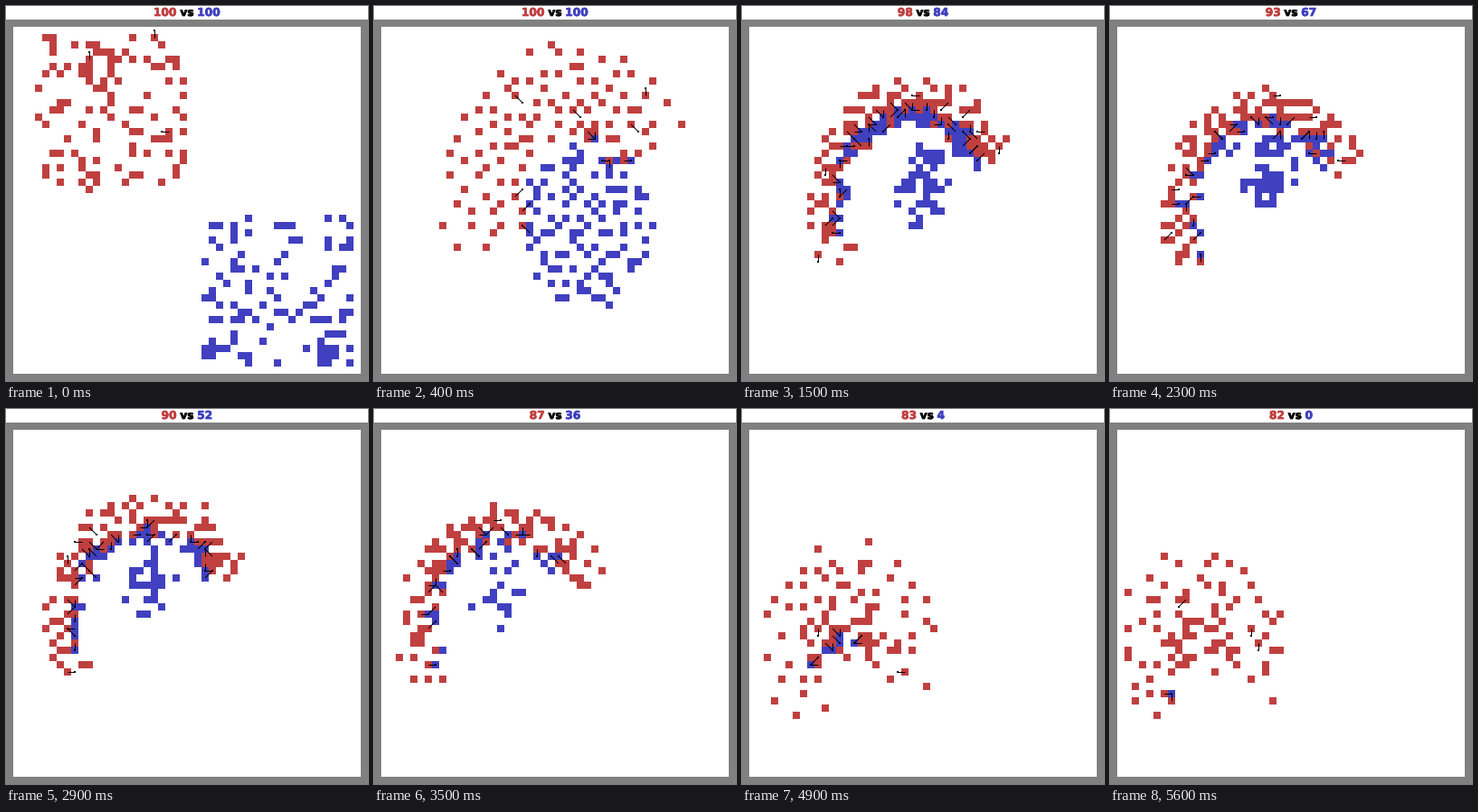
A matplotlib script that plays this animation: 400x415 px, repeating every 5.7 s.

```python
import numpy as np
import matplotlib.pyplot as plt
from matplotlib.animation import FuncAnimation
from matplotlib.collections import LineCollection, PolyCollection
from matplotlib.patches import Rectangle
from matplotlib.patheffects import withStroke

W, H, CELL, SIZE, N = 400, 415, 8, 48, 100
FRAMES, STEP, CLASH = 57, 100, 4
COLORS = {"red": "#c04040", "blue": "#4040c0"}
TIMES = [0, 4, 15, 23, 35, 49, 56]
COUNTS = {
    "red": [100, 100, 98, 93, 87, 83, 82],
    "blue": [100, 100, 84, 67, 36, 4, 0],
}

rng = np.random.default_rng(12)
GOLDEN = (5 ** 0.5 - 1) / 2
IDX = np.arange(N)
U = (IDX + 0.5) / N                       # place along the battle line
V = 2 * (IDX * GOLDEN % 1) - 1            # place across it
TURN = 2 * np.pi * GOLDEN * IDX           # sunflower layout of the core
DISC = np.c_[np.cos(TURN), np.sin(TURN)] * np.sqrt(U)[:, None]
PHASE = {team: rng.uniform(0, 2 * np.pi, (N, 2)) for team in COLORS}
RANK = {team: rng.permutation(N) for team in COLORS}
FRONT = rng.random((N, 1)) < 0.55         # blue fighters who meet the line


def ease(t, a, b):
    x = np.clip((t - a) / (b - a), 0, 1)
    return x * x * (3 - 2 * x)


def arc(t, side, closing):
    """Points on the drifting battle arc, moved off it by side."""
    angle = np.radians(215 + 35 * closing - (190 + 95 * closing) * U ** 0.85)
    r = 100 - 45 * closing + side
    s = t - CLASH
    return np.c_[215 - 2.2 * s + r * np.cos(angle),
                 205 + 1.15 * s - 1.15 * r * np.sin(angle)]


def formation(team, t):
    closing = ease(t, 35, 49)
    gather = ease(t, CLASH, 15)
    width = 45 - 27 * gather + 25 * closing
    if team == "red":
        p = arc(t, width * V, closing)
    else:
        last = 1 - ease(t, 42, 56)
        center = [235 - 3.06 * (t - CLASH), 190 + 0.128 * (t - 24) ** 2]
        core = center + DISC * [70, 92] * (1 - 0.55 * gather) * last
        line = arc(t, 8 * V - width, closing)
        p = core + (line - core) * FRONT * gather * last
    p = p + 5 * np.sin(0.4 * t + PHASE[team])
    return (p - [8, 23]) / CELL - 0.5


def lattice(p):
    """Order points column by column, top to bottom."""
    cols = np.argsort(p[:, 0]).reshape(10, 10)
    return np.concatenate([c[np.argsort(p[c, 1])] for c in cols])


def camp(team, x, y, cols, rows):
    """Random start cells, matched to the first formation."""
    k = rng.choice(cols * rows, N, replace=False)
    cells = np.c_[x + k % cols, y + k // cols].astype(float)
    start = np.empty((N, 2))
    start[lattice(formation(team, CLASH))] = cells[lattice(cells)]
    return start


CAMPS = {"blue": camp("blue", 26, 26, 21, 21),
         "red": camp("red", 3, 1, 21, 22)}
SPAN = range(-6, 7)
NEAR = sorted(((dx, dy) for dx in SPAN for dy in SPAN),
              key=lambda d: d[0] ** 2 + d[1] ** 2)
AROUND = NEAR[1:9]


def count(team, t):
    return int(round(np.interp(t, TIMES, COUNTS[team])))


def place(t):
    """Cell -> team, every fighter on the nearest free cell."""
    board = {}
    f = min(t / CLASH, 1)
    for team, start in CAMPS.items():
        pos = start * (1 - f) + formation(team, max(t, CLASH)) * f
        pos = np.rint(pos).astype(int)
        # the fallen stay visible for one more step
        for x, y in pos[RANK[team] < count(team, t - 1)]:
            for dx, dy in NEAR:
                c = (int(x) + dx, int(y) + dy)
                if c not in board and 0 <= min(c) and max(c) < SIZE:
                    board[c] = team
                    break
    return board


def attacks(board, t):
    dice = np.random.default_rng(700 + t)
    hits = []
    for (x, y), team in board.items():
        spots = [(x + dx, y + dy) for dx, dy in AROUND]
        foes = [s for s in spots if board.get(s, team) != team]
        free = [s for s in spots if s not in board]
        p, q = dice.random(2)
        if foes and p < (0.7 if team == "red" else 0.25):
            hits.append(((x, y), foes[int(q * len(foes))]))
        elif not foes and free and team == "red" and p < 0.05:
            hits.append(((x, y), free[int(q * len(free))]))
    return hits


fig = plt.figure(figsize=(W / 100, H / 100), dpi=100, facecolor="white")
ax = fig.add_axes([0, 0, 1, 1])
ax.set(xlim=(0, W), ylim=(H, 0))
ax.axis("off")
ax.add_patch(Rectangle((0, 15), W, H - 15, fc="#808080", lw=0))
ax.add_patch(Rectangle((8, 23), W - 16, H - 31, fc="white", lw=0))
squares = PolyCollection([], lw=0, edgecolors="none", antialiaseds=False,
                         zorder=2)
blows = LineCollection([], colors="black", linewidths=0.72, zorder=3)
ax.add_collection(squares)
ax.add_collection(blows)
tips = ax.scatter([], [], s=2.6, c="black", marker="s", lw=0, zorder=4)


def label(color):
    return ax.text(0, 11, "", color=color, fontsize=8.8, weight="bold",
                   family="DejaVu Sans", va="baseline",
                   path_effects=[withStroke(linewidth=0.5, foreground=color)])


title = [label(c) for c in (COLORS["red"], "black", COLORS["blue"])]


def set_title(t):
    words = [str(count("red", t)), "vs", str(count("blue", t))]
    scale = W / fig.bbox.width
    widths = []
    for item, word in zip(title, words):
        item.set_text(word)
        widths.append(item.get_window_extent().width * scale)
    gap = 3.6
    x = W / 2 - (sum(widths) + 2 * gap) / 2
    for item, w in zip(title, widths):
        item.set_x(x)
        x += w + gap


def draw(t):
    board = place(t)
    corners = np.array([(0, 0), (1, 0), (1, 1), (0, 1)])
    cells = np.array(list(board))[:, None] + corners
    squares.set_verts(cells * CELL + [8, 23])
    squares.set_facecolor([COLORS[team] for team in board.values()])
    hits = np.array(attacks(board, t), float).reshape(-1, 2, 2)
    hits = hits * CELL + [12, 27]
    blows.set_segments(list(hits))
    tips.set_offsets(hits[:, 1])
    set_title(t)
    return [squares, blows, tips, *title]


anim = FuncAnimation(fig, draw, frames=FRAMES, interval=STEP,
                     repeat=True, repeat_delay=0, blit=False)
plt.show()
```
